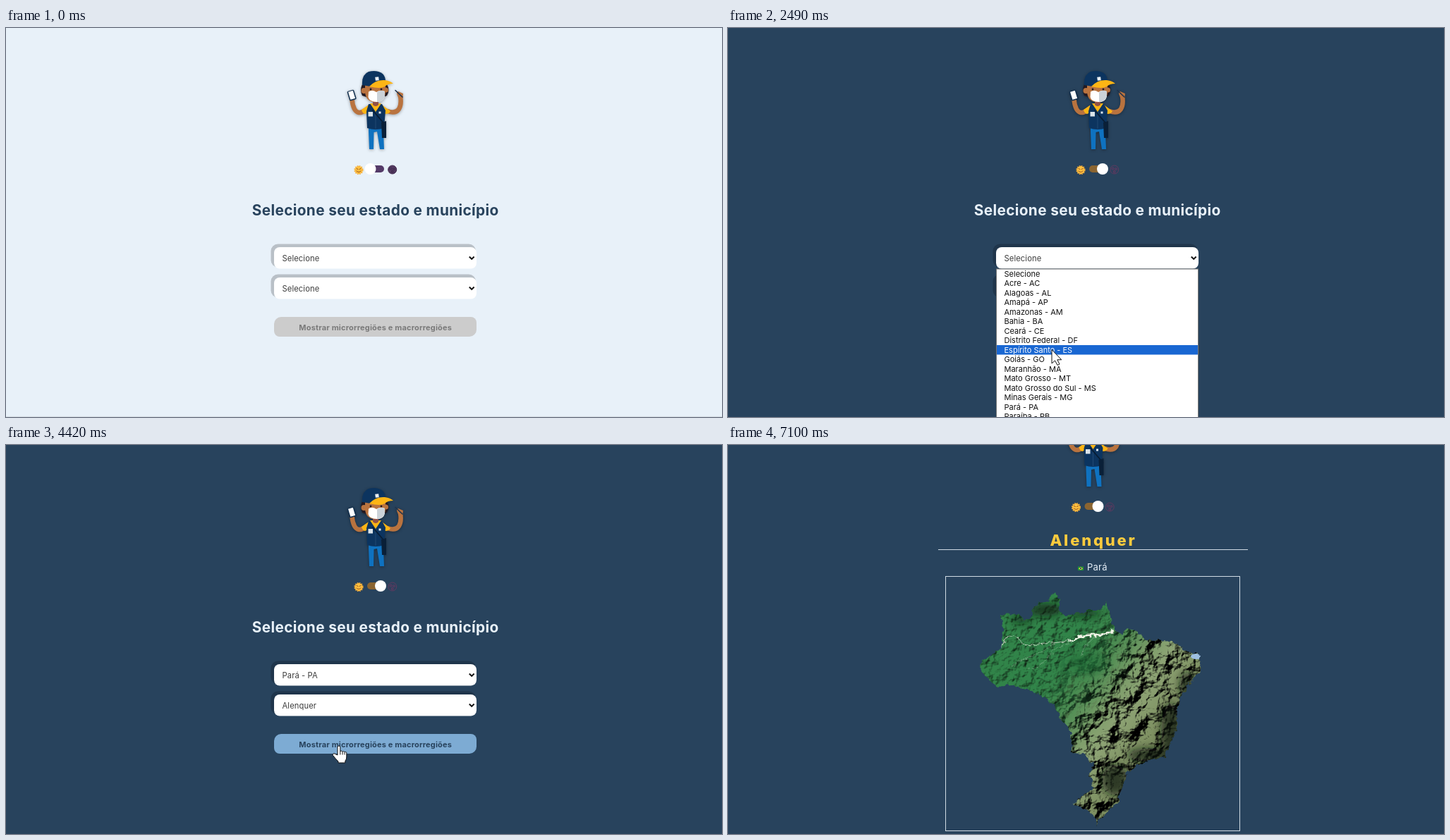
These frames come from a looping animation (1015 by 552 pixels, 8 s). An HTML page:

```html
<!DOCTYPE html>
<html lang="pt-BR">
<head>
<meta charset="utf-8">
<title>Selecione seu estado e município</title>
<style>
  html, body { margin: 0; width: 100%; height: 100%; overflow: hidden; background: var(--bg); }
  svg { display: block; width: 1015px; height: 552px; font-family: Inter, "Open Sans", sans-serif; }
  .title { font-size: 20.8px; font-weight: 700; letter-spacing: .35px; fill: var(--ink); }
  .field { font-size: 11.2px; letter-spacing: .1px; fill: #3c3c3c; }
  .action { font-size: 11px; font-weight: 700; letter-spacing: .17px; fill: var(--label); }
  .city { font-size: 22px; font-weight: 800; letter-spacing: 2.8px; fill: #ffcb3d; }
  .mid { text-anchor: middle; }
  .small { font-size: 13px; letter-spacing: .25px; }
  .popup { font-size: 11px; fill: #111; }
  .line { fill: none; stroke-linecap: round; stroke-linejoin: round; }
  #worker { filter: drop-shadow(0 1px 2px rgba(0, 0, 0, .35)); }
</style>
</head>
<body>
<svg viewBox="0 0 1015 552">
  <defs>
    <path id="land" d="M387 354L411 353 420 361 433 354 432 344 441 336 452 334 464 322 470 335 470 350 478 356
      507 348 526 348 536 336 544 359 548 374 556 382 565 374 580 376 592 389 630 392 650 404 668 411 671 430
      645 464 637 484 636 512 628 537 617 555 590 562 567 577 559 597 553 620 525 646 523 655 521 642 505 628
      489 623 500 612 519 600 513 582 517 567 505 551 487 550 488 532 484 516 470 500 464 482 424 458 401 454
      381 456 356 430 360 420 387 402 391 377Z"/>
    <linearGradient id="soil" gradientUnits="userSpaceOnUse" x1="400" y1="380" x2="640" y2="560">
      <stop offset="0" stop-color="#2f8a4c"/>
      <stop offset=".4" stop-color="#5f9358"/>
      <stop offset=".66" stop-color="#8da374"/>
      <stop offset="1" stop-color="#6d7c4e"/>
    </linearGradient>
    <linearGradient id="fade" gradientUnits="userSpaceOnUse" x1="440" y1="400" x2="545" y2="475">
      <stop offset=".25" stop-color="#fff"/>
      <stop offset="1" stop-color="#000"/>
    </linearGradient>
    <filter id="hills" x="0" y="0" width="1" height="1" color-interpolation-filters="sRGB">
      <feTurbulence type="fractalNoise" baseFrequency=".04" numOctaves="5" seed="7"/>
      <feGaussianBlur stdDeviation=".7"/>
      <feDiffuseLighting surfaceScale="17" diffuseConstant="1.3" lighting-color="#fff">
        <feDistantLight azimuth="225" elevation="48"/>
      </feDiffuseLighting>
      <feBlend mode="multiply" in2="SourceGraphic"/>
    </filter>
    <filter id="plain" x="0" y="0" width="1" height="1" color-interpolation-filters="sRGB">
      <feTurbulence type="fractalNoise" baseFrequency=".09" numOctaves="3" seed="3"/>
      <feGaussianBlur stdDeviation=".7"/>
      <feDiffuseLighting surfaceScale="3.5" diffuseConstant="1.25" lighting-color="#fff">
        <feDistantLight azimuth="225" elevation="52"/>
      </feDiffuseLighting>
      <feBlend mode="multiply" in2="SourceGraphic"/>
    </filter>
    <filter id="coast" filterUnits="userSpaceOnUse" x="340" y="310" width="345" height="350" color-interpolation-filters="sRGB">
      <feTurbulence type="fractalNoise" baseFrequency=".13" numOctaves="2" seed="5"/>
      <feDisplacementMap in="SourceGraphic" scale="9" xChannelSelector="R" yChannelSelector="G"/>
    </filter>
    <filter id="blur" x="-.6" y="-.6" width="2.2" height="2.2"><feGaussianBlur stdDeviation="6"/></filter>
    <mask id="shape" maskUnits="userSpaceOnUse" x="340" y="310" width="345" height="350">
      <use href="#land" fill="#fff" filter="url(#coast)"/>
    </mask>
    <mask id="northwest" maskUnits="userSpaceOnUse" x="340" y="310" width="345" height="350">
      <rect x="340" y="310" width="345" height="350" fill="url(#fade)"/>
    </mask>
  </defs>

  <rect width="1015" height="552" fill="var(--bg)"/>
  <rect y="551" width="1015" height="1" fill="var(--edge)"/>

  <g id="form">
    <text class="title mid" x="523.7" y="266">Selecione seu estado e município</text>
    <g id="fields"></g>
    <path d="M390 410H659a8 8 0 0 1 8 8V428a10 10 0 0 1-10 10H388a8 8 0 0 1-8-8V420a10 10 0 0 1 10-10Z" fill="var(--button)"/>
    <text class="action mid" x="523.7" y="428.5">Mostrar microrregiões e macrorregiões</text>
  </g>

  <g id="result">
    <g class="line" stroke="#ffcb3d" stroke-width="1.3"><path d="M309 38.5H300M304 34.2L299.8 38.5 304 42.8"/></g>
    <text class="small" x="313" y="42.5" fill="#ffcb3d">Voltar</text>
    <text class="city mid" x="518" y="256">Alenquer</text>
    <rect x="298" y="261" width="439" height="1" fill="#d0dbe4"/>
    <rect x="496" y="285.5" width="8" height="5.5" fill="#21913a"/>
    <path d="M497 288.2L500 286.2 503 288.2 500 290.2Z" fill="#ffd83d"/>
    <circle cx="500" cy="288.2" r="1.1" fill="#1f3f7a"/>
    <text class="small" x="509" y="291" fill="#e8f1f9">Pará</text>
    <rect x="308.5" y="299.5" width="417" height="361" fill="none" stroke="#d0dbe4"/>
    <g id="map" mask="url(#shape)">
      <rect x="340" y="310" width="345" height="350" fill="url(#soil)" filter="url(#hills)"/>
      <g mask="url(#northwest)">
        <rect x="340" y="310" width="345" height="350" fill="#318449" filter="url(#plain)"/>
      </g>
      <g fill="#07150c" opacity=".7" filter="url(#blur)">
        <ellipse cx="450" cy="347" rx="24" ry="9"/>
        <ellipse cx="416" cy="361" rx="14" ry="5"/>
        <ellipse cx="506" cy="352" rx="24" ry="5"/>
        <ellipse cx="628" cy="520" rx="14" ry="42"/>
        <ellipse cx="598" cy="553" rx="32" ry="10"/>
        <ellipse cx="548" cy="588" rx="18" ry="22"/>
        <ellipse cx="650" cy="455" rx="10" ry="20"/>
      </g>
      <ellipse cx="510" cy="422" rx="28" ry="18" fill="#1d6b35" opacity=".5" filter="url(#blur)"/>
      <ellipse cx="664" cy="413" rx="8" ry="4" fill="#9dbfe0"/>
      <g class="line" stroke="#f1f3e6" filter="url(#coast)">
        <path d="M546 376Q532 384 516 383T486 391" stroke-width="2.6"/>
        <path d="M486 391Q458 394 440 396T410 387 387 400" stroke-width="1.1" opacity=".7"/>
        <path d="M484 392Q462 402 452 416T424 430M462 394Q446 408 432 412T400 428M520 384Q506 396 500 412" stroke-width=".7" opacity=".4"/>
      </g>
    </g>
  </g>

  <g id="hero">
    <g id="worker">
      <path d="M505 80Q501 88 505 96L511 98 511 80ZM540 80Q545 88 540 96L535 98 535 80Z" fill="#231a22"/>
      <g class="line" stroke="#b9733f" stroke-width="6.5">
        <path d="M509 117Q499 124 494 115 491 109 490.500 101"/>
        <path d="M541 118Q552 122 557 115 561 108 559 97"/>
      </g>
      <path d="M487 97Q484 92 487 91L495 100 490 104ZM556 98Q552 91 556 90L563 93 562 101Z" fill="#b9733f"/>
      <g transform="rotate(-17 490 95)">
        <rect x="485" y="88.500" width="10" height="14" rx="1.500" fill="#12304f"/>
        <rect x="486.500" y="89.500" width="7" height="11.500" fill="#fff"/>
      </g>
      <path class="line" d="M552 88.500L562 98" stroke="#20334c" stroke-width="1.600"/>
      <path d="M514 139H534L535 147 536 172H530L526 147 521.500 148 521 172H515L514 147Z" fill="#0f72c0"/>
      <path d="M514 109L504 116Q505 121 509 122L515 119ZM533 109L545 118Q543 122 538 122L532 119Z" fill="#fdb515"/>
      <path d="M514 108H533L538 117 536 142Q524 146 512 142L511 118Z" fill="#0c345f"/>
      <path d="M516 107H532L524 119Z" fill="#fdb515"/>
      <path d="M520 103H528V109Q524 113 520 109Z" fill="#925247"/>
      <path d="M524 119V143" stroke="#2c547d" stroke-width=".7"/>
      <path class="line" d="M520 117L538 138" stroke="#081d34" stroke-width="1.800"/>
      <path d="M532 134L539 132V156H533Z" fill="#0a2038"/>
      <rect x="513.500" y="119" width="6.500" height="6.500" fill="#dbe4ea"/>
      <rect x="528.500" y="118.500" width="3" height="3" fill="#dbe4ea"/>
      <circle cx="507.500" cy="89" r="4" fill="#b9733f"/>
      <circle cx="538.500" cy="88" r="3.500" fill="#b9733f"/>
      <path d="M509 80H538V91Q537 105 524 105 510 105 509 91Z" fill="#b9733f"/>
      <path d="M514 90.500Q519 87 525 91 531 87 537 90V97Q535 105 526 105 515 105 513.500 98Z" fill="#fff"/>
      <path d="M526 91Q531 87 537 90V97Q535 105 526 105Z" fill="#cbd2d8"/>
      <circle cx="517" cy="87" r="1.400" fill="#231a22"/>
      <circle cx="532" cy="87" r="1.400" fill="#231a22"/>
      <path d="M505 81Q504 66 514 62 526 59 534 65 538 69 538 76L517 83Z" fill="#0c345f"/>
      <path d="M515 83Q524 73 537 74 545 75 549 79 541 79 537 83 531 87 515 83Z" fill="#fdb515"/>
      <rect x="523.500" y="69.500" width="5" height="5" fill="#e9eef2" transform="rotate(-8 526 72)"/>
    </g>
    <circle cx="500" cy="201.500" r="5.400" fill="#fdc13f"/>
    <circle cx="500" cy="201.500" r="5.600" fill="none" stroke="#f7ae3a" stroke-width="2" stroke-dasharray="1.760 1.170"/>
    <path class="line" d="M497 199.500L499 200.500M503 199.500L501 200.500M497 203Q500 206 503 203" stroke="#97501f"/>
    <rect x="512" y="195" width="24" height="10" rx="5" fill="var(--track)"/>
    <circle cx="547.700" cy="201" r="6" fill="var(--moon)" stroke="var(--rim)"/>
    <g fill="none" stroke="var(--rim)" stroke-width="1.100">
      <circle cx="545.500" cy="199.500" r="1.500"/><circle cx="550" cy="200" r="1.300"/><circle cx="547.700" cy="204" r="1.400"/>
    </g>
    <circle id="knob" cy="200" r="8" fill="#fff"/>
  </g>

  <g id="popups"></g>

  <g id="cursor">
    <circle id="halo" r="14" fill="#ff0" opacity=".52"/>
    <g fill="#fff" stroke="#111" stroke-linejoin="round">
      <path id="arrow" d="M0 0V19.500L4.500 15.500 8 22 11 20.500 7.800 14.300H13.800Z"/>
      <g id="hand">
        <path d="M-2 14V2.800a1.900 1.900 0 0 1 3.800 0V9a1.700 1.700 0 0 1 3.200.6 1.600 1.600 0 0 1 3 .7 1.500 1.500 0 0 1 2.800.9V17q0 3-2 5.500V25H-1V23q-4-4-7.500-8.500a1.800 1.800 0 0 1 2.600-2.400Z"/>
        <path d="M1.800 9V13.500M5 9.600V13.500M8 10.500V13.500" fill="none"/>
      </g>
    </g>
  </g>
</svg>
<script>
  const LOOP = 8000, ROW = 13.5;
  const $ = id => document.getElementById(id);
  const root = document.documentElement.style;
  const show = (el, on) => { el.style.display = on ? '' : 'none'; };
  const clamp = x => Math.min(1, Math.max(0, x));
  const ease = x => x * x * (3 - 2 * x);
  const span = (t, a, b) => ease(clamp((t - a) / (b - a)));
  const within = (t, a, b) => t >= a && t < b;
  const mix = (a, b, p) => 'rgb(' + [1, 3, 5].map(i => {
    const u = parseInt(a.substr(i, 2), 16), v = parseInt(b.substr(i, 2), 16);
    return Math.round(u + (v - u) * p);
  }) + ')';

  const theme = {
    bg: ['#e8f1f9', '#28435d'], ink: ['#28435d', '#e8f1f9'], shade: ['#b9c0c7', '#1f354b'],
    edge: ['#d6dde4', '#28435d'], track: ['#543a68', '#8b6531'],
    moon: ['#533a61', '#2c415d'], rim: ['#432b50', '#5f3a60']
  };

  const fields = [311, 354].map(y => {
    $('fields').insertAdjacentHTML('beforeend',
      `<rect x="375.500" y="${y - 4.5}" width="290.500" height="33" rx="10" fill="var(--shade)"/>
       <rect x="380" y="${y}" width="287" height="30.500" rx="8" fill="#fff"/>
       <path d="M656.800 ${y + 13.5}l3.400 3.400 3.400-3.400" fill="none" stroke="#111" stroke-width="2"/>
       <text class="field" x="391.500" y="${y + 19.5}"></text>`);
    return $('fields').lastElementChild;
  });

  function makePopup(top, names) {
    const g = document.createElementNS('http://www.w3.org/2000/svg', 'g');
    g.setAttribute('class', 'popup');
    const rows = names.map((name, i) => `<text x="391.500" y="${top + i * ROW + 10.5}">${name}</text>`);
    g.innerHTML = `<rect x="380.500" y="${top}" width="286" height="${names.length * ROW}" fill="#fff" stroke="#777"/>
      <rect class="mark" x="381" width="285" height="${ROW}" fill="#1967d2"/>` + rows.join('');
    $('popups').append(g);
    const mark = g.querySelector('.mark'), labels = g.querySelectorAll('text');
    return (open, y) => {
      show(g, open);
      const pick = Math.min(names.length - 1, Math.max(0, Math.floor((y - top) / ROW)));
      mark.setAttribute('y', top + pick * ROW);
      labels.forEach((el, i) => { el.style.fill = i === pick ? '#fff' : ''; });
    };
  }

  const states = makePopup(342, ['Selecione', 'Acre - AC', 'Alagoas - AL', 'Amapá - AP', 'Amazonas - AM',
    'Bahia - BA', 'Ceará - CE', 'Distrito Federal - DF', 'Espírito Santo - ES', 'Goiás - GO', 'Maranhão - MA',
    'Mato Grosso - MT', 'Mato Grosso do Sul - MS', 'Minas Gerais - MG', 'Pará - PA', 'Paraíba - PB']);
  const towns = makePopup(385, ['Selecione', 'Abaetetuba', 'Abel Figueiredo', 'Acará', 'Afuá', 'Água Azul do Norte',
    'Alenquer', 'Almeirim', 'Altamira', 'Anajás', 'Ananindeua', 'Anapu', 'Augusto Corrêa']);

  // Pointer moves: start, end, target x, target y
  const home = [838, 536];
  const moves = [
    [180, 1000, 519, 210], [1000, 1070, 515, 201], [1450, 1880, 459, 325], [2340, 2600, 459, 537],
    [2720, 2990, 459, 371], [3340, 3640, 468, 467], [3920, 4400, 472, 426], [6820, 7100, 517, 521]
  ];
  const clicks = [[1190, 1340], [2220, 2360], [2610, 2730], [3120, 3270], [3700, 3820]];

  function pointer(t) {
    let [x, y] = home;
    for (const [a, b, tx, ty] of moves) {
      const p = span(t, a, b);
      x += (tx - x) * p;
      y += (ty - y) * p;
    }
    return [x, y];
  }

  function draw(t) {
    const dark = span(t, 1330, 1620);
    for (const key in theme) root.setProperty('--' + key, mix(...theme[key], dark));
    const ready = span(t, 3900, 4250);
    root.setProperty('--button', mix('#cccccc', '#7dabd3', ready));
    root.setProperty('--label', mix('#7a7a7a', '#28435d', ready));
    $('knob').setAttribute('cx', 516.5 + 14.5 * dark);

    const [x, y] = pointer(t);
    states(within(t, 2290, 2700), y);
    towns(within(t, 3260, 3800), y);
    fields[0].textContent = t < 2700 ? 'Selecione' : 'Pará - PA';
    fields[1].textContent = t < 3800 ? 'Selecione' : 'Alenquer';

    const done = t >= 5350, scroll = Math.round(113 * span(t, 6130, 6560));
    show($('form'), !done);
    show($('result'), done);
    show($('map'), t >= 5430);
    $('result').setAttribute('transform', `translate(0 ${-scroll})`);
    $('hero').setAttribute('transform', `translate(${done ? -6.5 : 0} ${-scroll})`);

    const overToggle = within(t, 1040, 1890) && y < 209;
    const overButton = within(t, 3900, 5350) && y < 438;
    show($('cursor'), within(t, 200, 7100));
    $('cursor').setAttribute('transform', `translate(${x} ${y})`);
    show($('hand'), overToggle || overButton);
    show($('arrow'), !(overToggle || overButton));
    show($('halo'), clicks.some(([a, b]) => within(t, a, b)));
  }

  const start = performance.now();
  function frame(now) {
    draw(Math.max(0, now - start) % LOOP);
    requestAnimationFrame(frame);
  }
  draw(0);
  requestAnimationFrame(frame);
</script>
</body>
</html>
```
